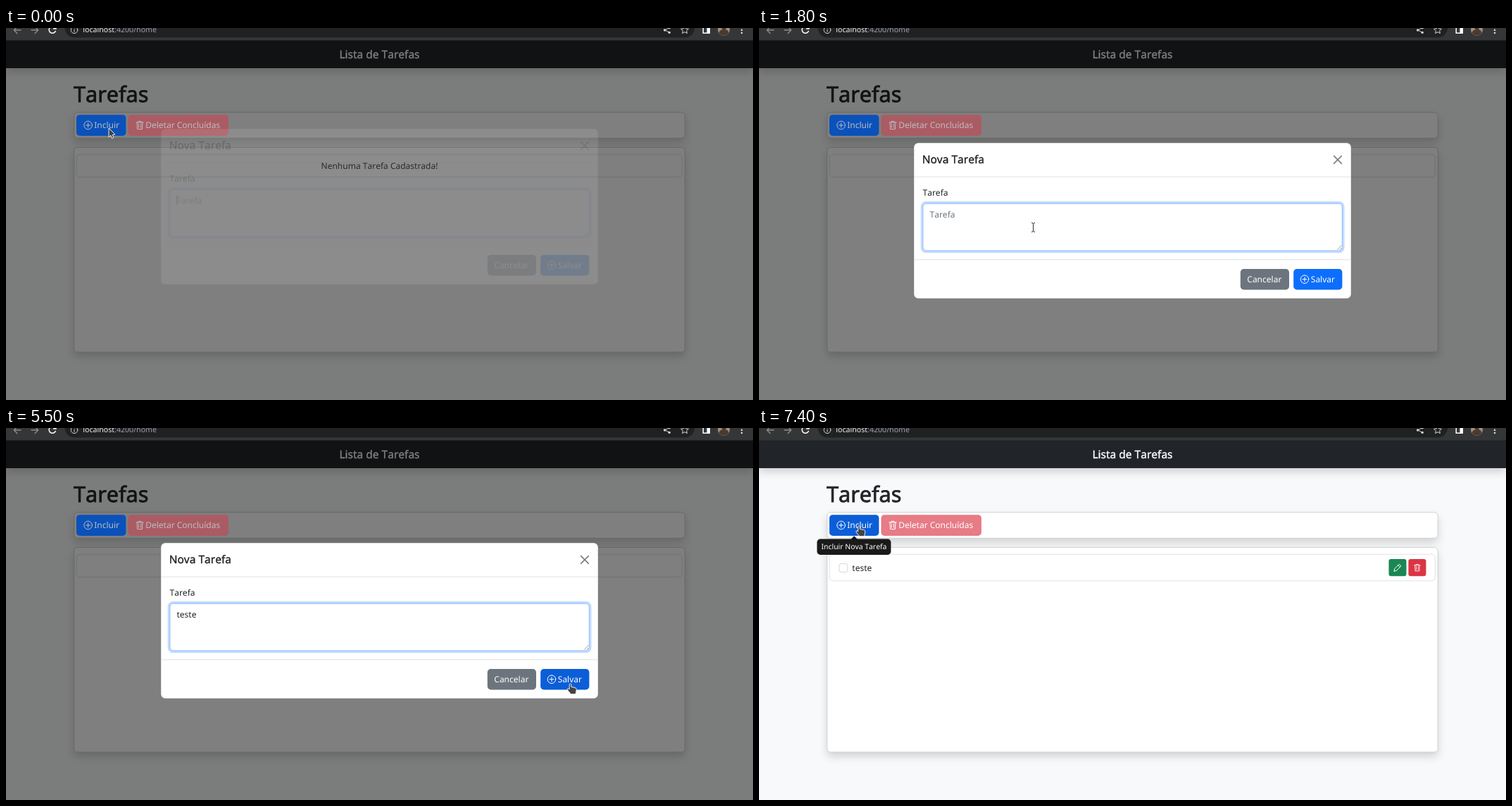
Animation, 1061 px wide and 528 px high, one loop 8 s. Source, as an HTML page:

```html
<!DOCTYPE html>
<html lang="pt-BR">
<head>
<meta charset="utf-8">
<title>Lista de Tarefas</title>
<style>
  html, body { margin: 0; width: 100%; height: 100%; overflow: hidden; background: #f8f9fa; }
  svg { display: block; }
  text {
    font: 12px "Noto Sans", "Open Sans", sans-serif;
    font-kerning: none;
    text-rendering: geometricPrecision;
    fill: #212529;
    white-space: pre;
  }
  .mid { text-anchor: middle; }
  .medium { font-size: 15.5px; stroke: #212529; stroke-width: .35px; }
  .white { fill: #fff; }
  .line { fill: none; stroke: #fff; stroke-width: 1; stroke-linecap: round; stroke-linejoin: round; }
  .card { fill: #fff; stroke: #cfd0d1; filter: drop-shadow(0 6px 6px rgba(0, 0, 0, .15)); }
  .item { fill: #fff; stroke: #dee2e6; }
  .primary { fill: #0d6efd; }
  .primary.hover { fill: #0b5ed7; }
  .danger { fill: #dc3545; }
  .dimmed { filter: brightness(.74); }
  .pointer { fill: #444; stroke: #fff; stroke-width: .9; stroke-linejoin: round; }
</style>
</head>
<body>
<svg width="1061" height="528" viewBox="0 0 1061 528">
  <defs>
    <g id="plus" class="line">
      <circle r="5.8"/>
      <path d="M-3 0H3M0-3V3"/>
    </g>
    <g id="trash" class="line">
      <path d="M-5-4H5M-2-4V-5.6H2V-4M-4-4L-3.4 5.6H3.4L4-4M-1.6-1.8V3.4M1.6-1.8V3.4"/>
    </g>
  </defs>

  <!-- page -->
  <rect width="1061" height="528" fill="#f8f9fa"/>
  <rect y="17" width="1061" height="40" fill="#212529" style="filter:drop-shadow(0 6px 6px rgba(0,0,0,.15))"/>
  <text class="mid medium white" x="530.5" y="42.7" style="stroke:#fff">Lista de Tarefas</text>
  <text class="medium" x="96" y="104.8" style="font-size:30.6px;stroke-width:.8px">Tarefas</text>
  <rect class="card" x="96.8" y="119.8" width="867.4" height="36.6" rx="4.7"/>
  <rect class="card" x="96.8" y="169.5" width="867.4" height="290.5" rx="4.7"/>
  <g id="empty">
    <rect class="item" x="100.3" y="179.3" width="860" height="32.2" rx="4.7"/>
    <text class="mid" x="530.5" y="199.8">Nenhuma Tarefa Cadastrada!</text>
  </g>
  <g id="task">
    <rect class="item" x="100.3" y="179.3" width="860" height="37.6" rx="4.7"/>
    <rect x="113.8" y="192.6" width="12" height="12" rx="2.6" fill="#fff" stroke="#d3d7db"/>
    <text x="132.3" y="203.1">teste</text>
    <rect x="894.5" y="186" width="25" height="24.3" rx="3.2" fill="#198754"/>
    <path class="line" d="M902 203L903 199.5L909.3 193.2L912 195.9L905.6 202.2ZM907.6 194.9L910.3 197.6"/>
    <rect class="danger" x="922.4" y="186" width="25" height="24.3" rx="3.2"/>
    <use href="#trash" transform="translate(934.9 198.2) scale(.85)"/>
  </g>
  <rect id="backdrop" y="17" width="1061" height="511" opacity=".5"/>

  <g id="tools">
    <rect id="add" class="primary" x="100" y="123.2" width="70.4" height="29.7" rx="4.7"/>
    <use href="#plus" x="116.6" y="138"/>
    <text class="white" x="125.2" y="142.2">Incluir</text>
    <rect x="173.4" y="123.2" width="142.5" height="29.7" rx="4.7" fill="#e77b86"/>
    <use href="#trash" x="190" y="138"/>
    <text class="white" x="198.2" y="142.2">Deletar Concluídas</text>
  </g>

  <!-- browser bar -->
  <rect width="1061" height="17.5" fill="#353638"/>
  <rect x="83.5" y="-14" width="894.5" height="27.5" rx="13.7" fill="#202123"/>
  <path class="line" d="M21 3H11.5M16-1.8L11.3 3L16 7.8M36 3H45.5M41-1.8L45.7 3L41 7.8" style="stroke:#8b8c8e;stroke-width:1.3"/>
  <path class="line" d="M70.3 4.6A4.8 4.8 0 1 1 69.4-.8L70.8.8M71-2.5V1H67.5" style="stroke-width:1.5"/>
  <g class="line" style="stroke:#d4d6d9">
    <circle cx="97" cy="2.8" r="4.8"/>
    <path d="M97 2.4V5.3M97 .3V.4M936 3L942-.2M936 3L942 6.3"/>
    <path d="M964-2.6L965.7.9L969.4 1.3L966.6 3.9L967.4 7.6L964 5.7L960.6 7.6L961.4 3.9L958.6 1.3L962.3.9Z"/>
  </g>
  <g fill="#d4d6d9">
    <circle cx="935.6" cy="3" r="1.7"/><circle cx="942.2" cy="-.4" r="1.7"/><circle cx="942.2" cy="6.4" r="1.7"/>
    <circle cx="1045" cy="-1" r="1.3"/><circle cx="1045" cy="3" r="1.3"/><circle cx="1045" cy="7" r="1.3"/>
  </g>
  <path d="M989.5-3H1000V8H989.5ZM991-1.5V6.5H995.5V-1.5Z" fill="#fff" fill-rule="evenodd"/>
  <circle cx="1019.5" cy="2.5" r="8.4" fill="#a58f7c"/>
  <path d="M1012.5 7Q1014 2 1018 2.5A3.5 3.5 0 1 1 1022 2Q1026 3 1026.5 7A8.4 8.4 0 0 1 1012.5 7Z" fill="#4a3a31"/>
  <text x="109.3" y="6.4" style="font-size:10.6px;fill:#e8eaed">localhost<tspan fill="#9aa0a6">:4200/home</tspan></text>

  <!-- dialog -->
  <g id="modal">
    <rect x="220.2" y="163.2" width="620.6" height="220.6" rx="6" fill="#fff"/>
    <path d="M220.5 211.3H840.5M220.5 328.8H840.5" stroke="#dee2e6"/>
    <text class="medium" x="231.7" y="192.3">Nova Tarefa</text>
    <path class="line" d="M816.6 181.6L827.4 192.4M827.4 181.6L816.6 192.4" style="stroke:#7b7b7b;stroke-width:1.5"/>
    <text x="232.5" y="238.2">Tarefa</text>
    <rect x="231.2" y="247.5" width="598.8" height="70.2" rx="6" fill="none" stroke="#c2dbfe" stroke-width="3"/>
    <rect x="232.9" y="249.2" width="595.4" height="66.8" rx="4.7" fill="#fff" stroke="#86b7fe"/>
    <path d="M821.5 314.5L827.5 308.5M825 314.5L827.5 312" stroke="#8a8a8a" stroke-width=".8"/>
    <text id="input" x="242.5" y="268.6"></text>
    <rect id="caret" y="257" width="1" height="14" fill="#111"/>
    <rect x="683.8" y="342" width="69.2" height="29.4" rx="4.7" fill="#6c757d"/>
    <text class="white" x="693.3" y="361">Cancelar</text>
    <rect id="save" class="primary" x="759.2" y="342" width="69.2" height="29.4" rx="4.7"/>
    <use href="#plus" x="775" y="356.7"/>
    <text class="white" x="783.8" y="361">Salvar</text>
  </g>

  <g id="tip">
    <path d="M130.5 158L135.2 153.2L139.9 158Z" opacity=".9"/>
    <rect x="82.4" y="157.6" width="105" height="22.4" rx="4.7" fill="#1a1a1a"/>
    <text class="mid white" x="135" y="172.3" style="font-size:10.4px">Incluir Nova Tarefa</text>
  </g>

  <g id="mouse">
    <path id="arrow" class="pointer" d="M.5.5V13.2L3.4 11L5.1 15.2L7.4 14.2L5.8 10.2L9.4 9.6Z"/>
    <path id="beam" d="M-2.5-6.5Q0-6.5 0-5V5Q0 6.5-2.5 6.5M2.5-6.5Q0-6.5 0-5M0 5Q0 6.5 2.5 6.5" fill="none" stroke="#333"/>
    <path id="hand" class="pointer" d="M-1.3 1.3Q0-1 1.4 1.3V5L6.5 6Q8.8 6.5 8.8 9L7.6 15.2H.8L-3.8 9.6Q-5 7.2-2.8 7.2L-1.3 8.4Z"/>
  </g>
</svg>
<script>
  const LOOP = 8000;
  const $ = id => document.getElementById(id);
  const show = (id, on) => $(id).style.display = on ? "" : "none";

  // Each track holds [start, ...values]; a value stays until the next start.
  const mouse = [
    [0, "arrow", 145.5, 141.5], [500, "arrow", 333, 204], [600, "arrow", 346, 211],
    [1000, "beam", 372, 262], [1100, "beam", 387, 285], [1200, "beam", 389.5, 283],
    [4600, "arrow", 625.5, 391], [4900, "arrow", 769, 348], [5200, "arrow", 814, 353],
    [5500, "hand", 801.5, 362.5], [5900, "arrow", 801, 363], [6400, "arrow", 441, 219],
    [6900, "arrow", 198, 168], [7100, "arrow", 191, 164], [7400, "hand", 142, 138.5]
  ];
  const dialog = [[0, .1, -20], [100, .77, -4.6], [500, 1, 0], [5900, 0, 0]];
  const typed = [[0, ""], [2600, "t"], [3700, "teste"], [4100, "teste "]];
  const caret = [
    [0, 242.5], [500, 0], [1200, 243], [1800, 0], [2400, 243], [2600, 247],
    [3700, 271.5], [4100, 274.3], [4600, 0], [5200, 274.3], [5500, 0]
  ];
  const at = (track, t) => track.findLast(step => step[0] <= t).slice(1);

  function draw(t) {
    const open = t < 5900;
    const [alpha, dy] = at(dialog, t);
    $("modal").setAttribute("opacity", alpha);
    $("modal").setAttribute("transform", `translate(0 ${dy})`);
    ["modal", "backdrop", "empty"].forEach(id => show(id, open));
    show("task", !open);
    $("tools").classList.toggle("dimmed", open);
    $("save").classList.toggle("hover", t >= 5500);
    $("add").classList.toggle("hover", t >= 7400);
    show("tip", t >= 7400);

    const [value] = at(typed, t);
    $("input").textContent = value || "Tarefa";
    $("input").style.fill = value ? "#212529" : "#6c757d";
    const [x] = at(caret, t);
    show("caret", x > 0);
    $("caret").setAttribute("x", x);

    const [shape, mx, my] = at(mouse, t);
    ["arrow", "beam", "hand"].forEach(id => show(id, id === shape));
    $("mouse").setAttribute("transform", `translate(${mx} ${my})`);
  }

  const start = performance.now();
  function tick() {
    draw((performance.now() - start) % LOOP);
    requestAnimationFrame(tick);
  }
  tick();
</script>
</body>
</html>
```
